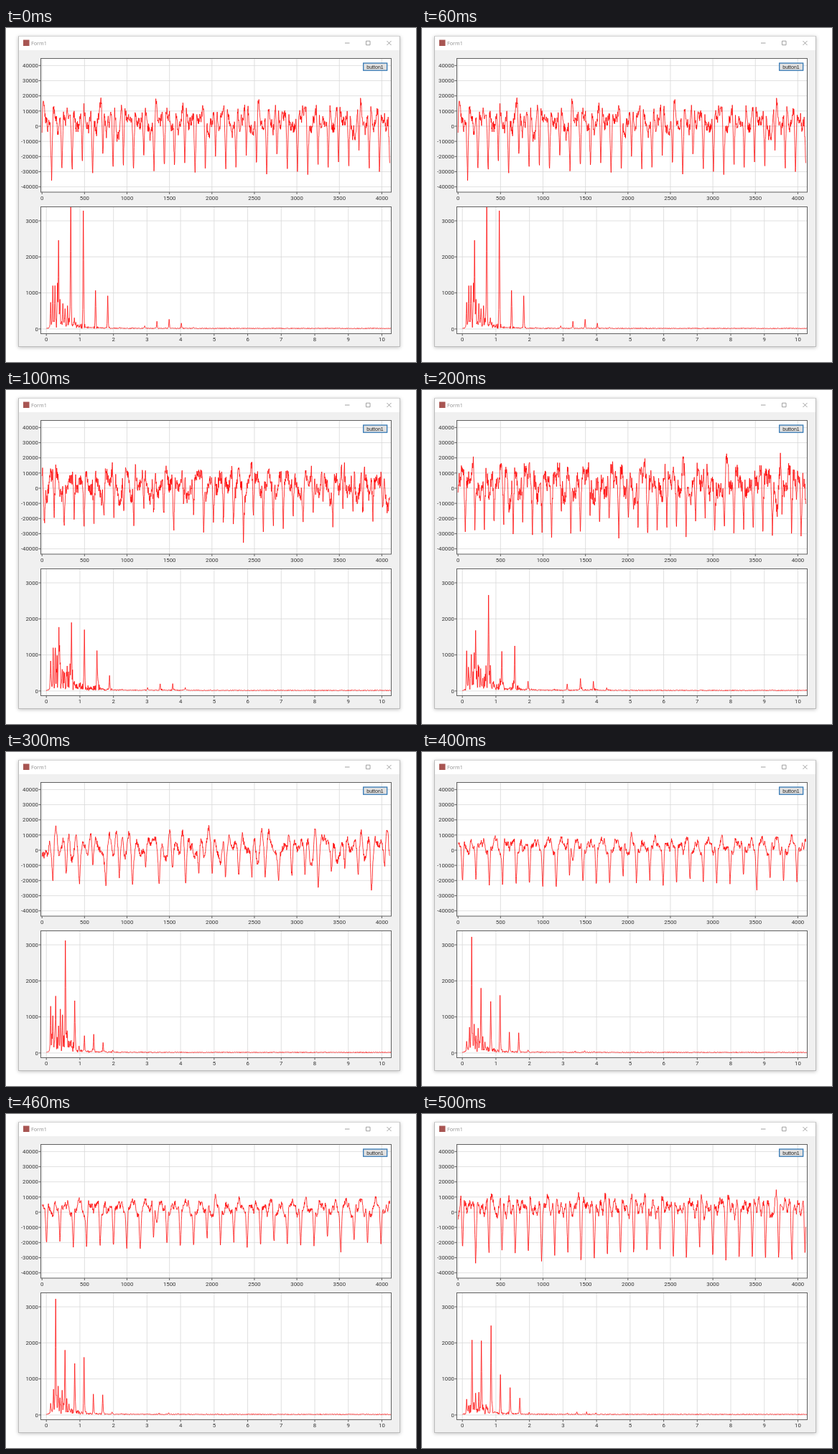
These frames come from a looping animation (571x466 px, 600 ms). An HTML page:

```html
<!DOCTYPE html>
<html lang="en">
<head>
<meta charset="utf-8">
<title>Form1</title>
<style>
  html, body { margin: 0; width: 100%; height: 100%; overflow: hidden; background: #fff; }
  svg { display: block; position: absolute; left: 0; top: 0; }
  #win {
    position: absolute; left: 17px; top: 11px; width: 532px; height: 434px;
    box-sizing: border-box; border: 1px solid #bcbcbc; border-top-color: #d4d4d4;
    background: linear-gradient(#fff 19px, #f0f0f0 19px);
    box-shadow: 0 1px 5px rgba(0, 0, 0, .25);
  }
  text { font-family: Roboto, "Liberation Sans", sans-serif; font-size: 7.8px; fill: #333; }
  .title { font-family: "Open Sans", sans-serif; font-size: 7.2px; fill: #8c8c8c; }
  .button { font-family: "Liberation Sans", sans-serif; font-size: 7px; fill: #222; }
  .ctl { fill: none; stroke: #8a8a8a; stroke-width: .8; }
  .grid { stroke: #d8d8d8; stroke-width: .8; }
  .tick, .frame { fill: none; stroke: #606060; stroke-width: 1; }
  .trace { fill: none; stroke: #f00; stroke-width: .75; stroke-linejoin: round; }
</style>
</head>
<body>
<div id="win"></div>
<svg width="571" height="466" viewBox="0 0 571 466">
  <rect x="24" y="16.5" width="8.5" height="8.5" fill="#a85552"/>
  <text class="title" x="35" y="23.6">Form1</text>
  <path class="ctl" d="M472 21h6.5M501.5 18.2h5.5v5.5h-5.5zM530.5 18l6 6m0-6l-6 6"/>
  <g id="plots"></g>
  <rect x="497.7" y="49" width="33" height="10.2" fill="#e1e1e1" stroke="#3579b5" stroke-width="1.3"/>
  <text class="button" x="514" y="56.7" text-anchor="middle">button1</text>
</svg>
<script>
const HOLD = 100;
const CYCLE = 244;        // wave period in px = CYCLE / spectrum offset in px
const ZERO_HZ = 56.2;

// step: harmonic spacing, heights: first harmonics, side: strength of the other partials,
// smear: width of a peak's foot, formant: upper bump, dip and low: place and depth of a trough
const scenes = [
  { seed: 11, step: 17.1, heights: [2460, 3700, 3280, 1070, 920], side: 1500, smear: .8, formant: 270, dip: 434.5, low: -33, rough: 3 },
  { seed: 23, step: 17.6, heights: [1770, 1900, 1700, 1120, 430], side: 1500, smear: 2.2, formant: 220, dip: 289, low: -32, rough: 4 },
  { seed: 37, step: 18.25, heights: [1680, 2660, 1100, 1250, 270], side: 1500, smear: 2.6, formant: 350, dip: 234, low: -33, rough: 4.5 },
  { seed: 41, step: 13.2, heights: [1580, 3120, 1450, 480, 520, 290], side: 1300, smear: 1.3, formant: 25, dip: 398, low: -26, rough: 2 },
  { seed: 53, step: 13.1, heights: [3220, 1800, 1430, 1600, 580, 560], side: 900, smear: 1, formant: 60, dip: 205.5, low: -25, rough: 1.5 },
  { seed: 67, step: 13.3, heights: [2080, 2060, 2480, 1120, 760, 470], side: 800, smear: 1.1, formant: 90, dip: 166.5, low: -33, rough: 2 }
];

function rng(seed) {
  return () => {
    seed = (seed * 1664525 + 1013904223) % 4294967296;
    return seed / 4294967296;
  };
}

const series = (n, fn) => Array.from({ length: n }, (_, i) => fn(i));
const toPath = pts => "M" + pts.map(([x, y]) => x.toFixed(2) + " " + y.toFixed(2)).join("L");
const waveY = k => 137 - k * 2.116;
const specY = v => 419.9 - v * 0.0503;

// Both charts are drawn from this one list of partials.
function makePartials({ step, heights, side, formant }, rand) {
  const harmonics = series(16, i => {
    const at = step * (i + 1);
    const upper = 90 * Math.exp((90 - at) / 20) + formant * Math.exp(-(((at - 168) / 28) ** 2));
    return { at, h: heights[i] ?? upper, phase: Math.PI };
  });
  const sides = series(14, i => {
    const at = 5.5 + 3.2 * i + 2 * rand();
    const fade = Math.exp(-Math.max(0, at - 20) / 14);
    return { at, h: side * fade * (.3 + .7 * rand()), phase: 2 * Math.PI * rand() };
  });
  return harmonics.concat(sides);
}

function wavePath(partials, { dip, low, rough }, rand) {
  const xs = series(1346, i => 50.2 + i * .36);
  const sums = xs.map(x => partials.reduce((sum, p) =>
    sum + p.h * Math.cos(2 * Math.PI * p.at * (x - dip) / CYCLE + p.phase), 0));
  const scale = low / Math.min(...sums);
  return toPath(xs.map((x, i) => [x, waveY(sums[i] * scale + (rand() - .5) * 2 * rough)]));
}

function spectrumPath(partials, { smear }, rand) {
  return toPath(series(962, i => {
    const d = i / 2;
    const rise = Math.min(1, d / 8) ** 2;
    const floor = 24 + 130 * rise * Math.exp(-d / 28);
    let peak = 0, foot = 0;
    for (const { at, h } of partials) {
      const gap = Math.abs(d - Math.round(at * 2) / 2);
      peak = Math.max(peak, h * (1 - gap / 1.2));
      foot += .4 * h / (1 + (gap / smear) ** 2);
    }
    const v = floor * (.2 + rand()) + rise * foot * rand() ** 2;
    return [ZERO_HZ + d, specY(Math.max(peak, v))];
  }));
}

function draw(scene) {
  const rand = rng(scene.seed);
  const partials = makePartials(scene, rand);
  return { wave: wavePath(partials, scene, rand), spec: spectrumPath(partials, scene, rand) };
}

const NS = "http://www.w3.org/2000/svg";
const plots = document.getElementById("plots");

function add(name, attrs, label) {
  const el = document.createElementNS(NS, name);
  for (const key in attrs) el.setAttribute(key, attrs[key]);
  if (label !== undefined) el.textContent = label;
  return plots.appendChild(el);
}

function plot({ id, top, bottom, xs, ys }) {
  const left = 48.5, right = 536.5;
  const box = { x: left, y: top, width: right - left, height: bottom - top };
  const line = (cls, d) => add("path", { class: cls, d });
  add("rect", { ...box, fill: "#fff" });
  for (const [x, label] of xs) {
    line("grid", `M${x} ${top}V${bottom}`);
    line("tick", `M${x} ${bottom}v3`);
    add("text", { x, y: bottom + 10.6, "text-anchor": "middle" }, label);
  }
  for (const [y, label] of ys) {
    line("grid", `M${left} ${y}H${right}`);
    line("tick", `M${left} ${y}h-3`);
    add("text", { x: 45, y: y + 2.8, "text-anchor": "end" }, label);
  }
  add("clipPath", { id }).appendChild(add("rect", box));
  const trace = add("path", { class: "trace", "clip-path": `url(#${id})` });
  add("rect", { ...box, class: "frame" });
  return trace;
}

const waveTrace = plot({
  id: "waveArea", top: 42.5, bottom: 229,
  xs: series(9, i => [50.2 + i * 59.15, i * 500]),
  ys: series(9, i => [waveY(40 - i * 10), 40000 - i * 10000])
});
const specTrace = plot({
  id: "specArea", top: 249.5, bottom: 426.5,
  xs: series(11, i => [ZERO_HZ + i * 46.73, i]),
  ys: series(4, i => [specY(i * 1000), i * 1000])
});

const drawn = scenes.map(draw);
const start = performance.now();
let shown = -1;

function show(now) {
  const i = Math.floor(Math.max(0, now - start) / HOLD) % drawn.length;
  if (i !== shown) {
    waveTrace.setAttribute("d", drawn[i].wave);
    specTrace.setAttribute("d", drawn[i].spec);
    shown = i;
  }
  requestAnimationFrame(show);
}
show(start);
</script>
</body>
</html>
```
